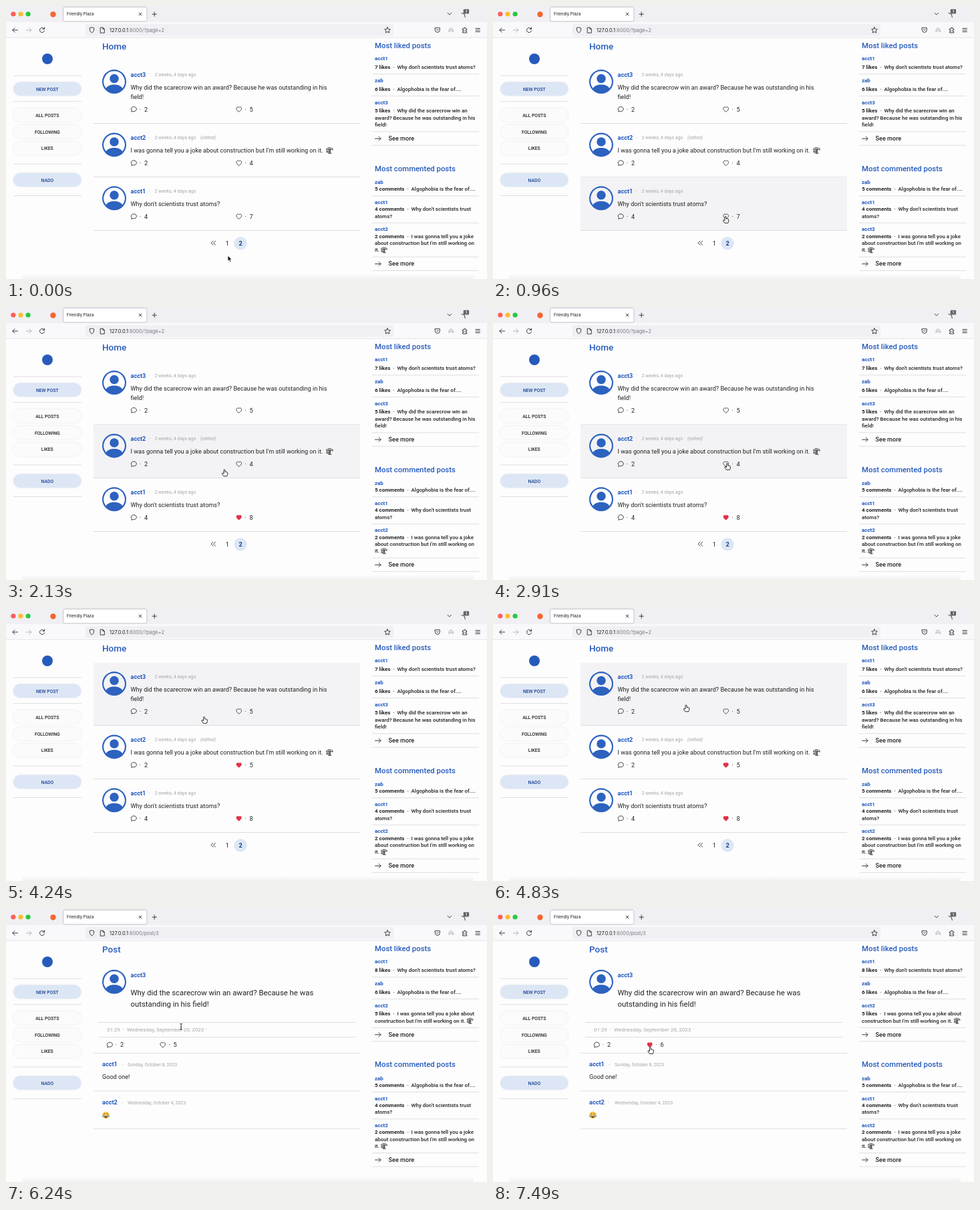
Animation of 720x408 px, one loop 7.58 s. Source, as an HTML page:

```html
<!DOCTYPE html>
<html lang="en">
<head>
<meta charset="utf-8">
<title>Friendly Plaza</title>
<style>
  html, body { margin: 0; width: 100%; height: 100%; overflow: hidden; background: #fdfdfe; }
  svg { display: block; width: 720px; height: 408px; font-family: Roboto, sans-serif; }
  .ui { font-family: Inter, sans-serif; }
  .line { fill: none; stroke: #3c3c42; stroke-width: 1; stroke-linecap: round; stroke-linejoin: round; }
  .rule { stroke: #dedee0; stroke-width: 1; }
  .hide { display: none; }
  .heart { fill: none; stroke: #222; stroke-width: 1.5; }
  .heart.on { fill: #dd3349; stroke: #dd3349; stroke-width: .6; }
  .pill { filter: drop-shadow(0 .5px .8px rgba(0, 0, 0, .11)); }
</style>
</head>
<body>
<svg id="stage" viewBox="0 0 720 408">
  <defs>
    <linearGradient id="fade" x1="0" y1="0" x2="0" y2="1">
      <stop offset="0" stop-color="#000" stop-opacity="0"/>
      <stop offset="1" stop-color="#000" stop-opacity=".05"/>
    </linearGradient>
    <g id="avatar" fill="#2d62bf">
      <circle cx="8" cy="6" r="3"/>
      <path fill-rule="evenodd" d="M0 8a8 8 0 1 1 16 0A8 8 0 0 1 0 8m8-7a7 7 0 0 0-5.47 11.37C3.24 11.23 4.8 10 8 10s4.76 1.23 5.47 2.37A7 7 0 0 0 8 1"/>
    </g>
    <path id="chat" fill="none" stroke="#222" stroke-width="1.5" stroke-linejoin="round" d="M3 12Q1 10 1 7.5C1 4 4 1.5 8 1.5s7 2.5 7 6-3 6-7 6q-1.5 0-2.7-.4Q3.6 14.5 1.5 14.6 2.8 13.4 3 12z"/>
    <path id="crane" fill="none" stroke="#333" stroke-width=".8" d="M.5 2.5 5 .8 10 2.3M.5 3.8H10M.5 2.5V3.8M10 2.3V5M4.3 1V9.5M6.5 1.4V9.5M4.3 4 6.5 6 4.3 8 6.5 9.5M6.5 4 4.3 6 6.5 8M1.8 3.8V6.2M.8 6.2H3V8H.8zM3 9.5H8.5"/>
    <g id="joy">
      <circle r="5.3" fill="#f5c648"/>
      <path d="M-3.2 .3H3.2Q2.8 3.9 0 3.9T-3.2 .3z" fill="#70421c"/>
      <path d="M-2.6 .4H2.6V1.4H-2.6z" fill="#fff"/>
      <path d="M-3.4 -1.3Q-2.2 -3 -1 -1.4M1 -1.4Q2.2 -3 3.4 -1.3" fill="none" stroke="#70421c" stroke-width=".8"/>
      <path d="M-3.3 -.2Q-6 1-5.4 3-3.3 3.3-3.3-.2zM3.3-.2Q6 1 5.4 3 3.3 3.3 3.3-.2z" fill="#4ba6e8"/>
    </g>
  </defs>
</svg>
<script>
const LOOP = 7580;
const BLUE = '#265bbb', INK = '#222', GRAY = '#a6a6aa';
const stage = document.getElementById('stage');

// Text placed by the middle of its capital letters
const text = (x, y, size, str, o = {}) =>
  `<text x="${x}" y="${(y + size * .355).toFixed(2)}" font-size="${size}" fill="${o.fill || INK}"
    font-weight="${o.bold || 400}" text-anchor="${o.anchor || 'start'}"${o.extra || ''}>${str}</text>`;
const rule = (x1, x2, y) => `<path class="rule" d="M${x1} ${y}H${x2}"/>`;
const line = (d, o = '') => `<path class="line" d="${d}" ${o}/>`;
const use = (id, x, y, s = 1) => `<use href="#${id}" transform="translate(${x} ${y}) scale(${s})"/>`;
const dot = (x, y, fill = INK) => text(x, y, 9, '·', { fill, anchor: 'middle' });
const name = (x, y, str, size = 9.12) => text(x, y, size, str, { fill: '#2058bd', bold: 700 });
const body = (x, y, str) => text(x, y, 9.12, str);
const title = (x, y, str, size) => text(x, y, size, str, { fill: BLUE, bold: 500 });

function counts(x, hx, y, comments, likes, id) {
  return use('chat', x, y - 4.6, .575) + dot(x + 14.3, y) + body(x + 20.3, y, comments) +
    `<path id="heart${id}" class="heart" transform="translate(${hx + .3} ${y - 3.8}) scale(.53)"
      d="M8.3 2C12.4-2.2 22.4 5 8.3 14.6-5.8 5 4.2-2.2 8.3 2z"/>` +
    dot(hx + 14.8, y) + `<g id="likes${id}">${body(hx + 20.4, y, likes)}</g>`;
}

function browser() {
  const lights = ['#fe5f57', '#febb2e', '#29c840'].map((c, i) =>
    `<circle cx="${10.9 + 11.1 * i}" cy="12" r="3.6" fill="${c}"/>`).join('');
  return `<path d="M0 0H720V24H0z" fill="#f0f0f4"/><path d="M0 24H720V47H0z" fill="#f9f9fb"/>
    <path d="M0 47.2H720" stroke="#dedee3" stroke-width=".8"/>${lights}
    <circle cx="70.5" cy="12.5" r="4.2" fill="#f4662f"/>
    <rect x="85.5" y="1.5" width="125.5" height="21.5" rx="2.4" fill="#fff" stroke="#bdbdc6" stroke-width=".9"/>
    <rect x="119" y="27" width="461" height="17.5" rx="2.5" fill="#f0f0f4"/>
    <g class="ui">${text(91, 12.3, 6.1, 'Friendly Plaza', { fill: '#15141a' })}
    ${['?page=2', 'post/3'].map((p, i) => `<g id="url${i}">` + text(155, 36, 7.36,
      `127.0.0.1<tspan fill="#77777f">:8000/${p}</tspan>`, { fill: '#15141a' }) + '</g>').join('')}</g>` +
    line('M199.2 10.2l3.8 3.8m0-3.8l-3.8 3.8M219 12.2h6.4M222.2 9v6.4') +
    line('M661 10.3l2.8 2.8 2.8-2.8') +
    line('M17.5 36H9.8M13 32.8L9.8 36 13 39.2') +
    line('M30.3 36H38M34.8 32.8L38 36 34.8 39.2', 'style="stroke:#b5b5ba"') +
    line('M57 33.8A3.6 3.6 0 1 0 57.6 37M57.6 32v2.5h-2.5') +
    line('M128.5 32l3.4 1.2q.2 5-3.4 7-3.6-2-3.4-7z') +
    line('M141.6 32.2h3.5l2.2 2.2v5.8h-5.7zM145 32.3v2.2h2.2') +
    line('M571 31.8l1.3 2.7 3 .4-2.2 2.1.6 3-2.7-1.5-2.7 1.5.6-3-2.2-2.1 3-.4z') +
    line('M642.3 32.7h7v3.2a3.5 3.5 0 0 1-7 0zM644.3 35l1.5 1.5 1.5-1.5') +
    line('M663 38.3q0-5.5 3.2-5.3 3.2.2 3.5 5.3M664.5 38l2-3 1.5 3', 'style="stroke:#a8a8ae"') +
    line('M683.7 34h2q-.5-2 1-2t1 2h2v2q-2-.5-2 1t2 1v2h-6v-2q1.8.3 1.8-1t-1.8-1z') +
    line('M703 33.5h6.4M703 36h6.4M703 38.5h6.4') +
    `<g id="badge0"><rect x="684.7" y="4.8" width="8.4" height="6.6" rx="1" fill="#626267"/>
      ${text(689, 8.1, 5.5, '1', { fill: '#fff', bold: 700, anchor: 'middle' })}
      ${line('M682 10.5l4.3 1.8 1 4.5')}</g>
    <g id="badge1"><rect x="682" y="5" width="11.3" height="7.2" rx="1" fill="#4a4a4f"/>
      <path d="M683.5 7H692M683.5 8.8H692M685 10.5H690.5" stroke="#aaa" stroke-width=".8" stroke-dasharray="1 .7"/>
      ${line('M687.5 12.5v4')}</g>`;
}

function menu() {
  const pill = (y, str, main) => `<rect class="pill" x="11" y="${y - 10.3}" width="101.5" height="20.4"
    rx="10.2" fill="${main ? '#dce6f5' : '#fbfbfc'}"/>` +
    text(61.8, y + .2, 6.84, str, { fill: main ? '#1d4390' : INK, bold: 500, anchor: 'middle' });
  return `<circle cx="62" cy="79" r="8" fill="${BLUE}"/>` +
    [104, 142.7, 236, 283.5].map(y => rule(11, 113, y)).join('') +
    pill(124, 'NEW POST', 1) + pill(163, 'ALL POSTS') + pill(188, 'FOLLOWING') +
    pill(212.7, 'LIKES') + pill(260, 'NADO', 1);
}

const JOKE = 'I was gonna tell you a joke about', FEAR = 'Algophobia is the fear of....';
const PITCH = 10.4;

// Each item: name, count, lines of text
function list(y, first, items) {
  let out = '';
  for (const [who, count, ...rows] of items) {
    out += name(552, y, who, 7.98);
    y += first;
    rows.forEach((row, i) => {
      const lead = i ? '' : `<tspan font-weight="700">${count}</tspan>\u00a0\u00a0·\u00a0\u00a0`;
      out += text(552, y, 7.95, lead + row, { bold: 500 });
      if (row.endsWith('it.')) out += use('crane', row === 'it.' ? 561 : 689.6, y - 4.6, .92);
      y += PITCH;
    });
    out += rule(548, 708, y);
    y += 9.4;
  }
  return out + line(`M552.5 ${y + 1}h8.6m-3-3l3 3-3 3`) +
    text(572.5, y + .6, 9.12, 'See more', { bold: 500 }) + rule(548, 708, y + 11);
}

function aside(id, top, shift) {
  const liked = [
    ['acct1', `${id ? 8 : 7} likes`, "Why don't scientists trust atoms?"],
    ['zab', '6 likes', FEAR], top];
  const talked = [
    ['zab', '5 comments', FEAR],
    ['acct1', '4 comments', "Why don't scientists trust", 'atoms?'],
    ['acct2', '2 comments', 'I was gonna tell you a joke', "about construction but I'm still working on", 'it.']];
  return title(552, 58.7, 'Most liked posts', 11.35) + list(78.6, 12.8, liked) +
    `<g transform="translate(0 ${-shift})">` + title(552, 242.5, 'Most commented posts', 11.35) +
    list(263.2, 10.2, talked) + '</g>';
}

function post(id, top, bottom, y, who, rows, comments, likes, edited) {
  const n = y + 19 + 14 * (rows.length - 1);
  return `<rect id="hover${id}" x="131" y="${top}" width="399" height="${bottom - top}" fill="#f3f3f5"/>` +
    use('avatar', 144, y - 26.2, 2.25) + name(186.5, y - 19, who) + dot(215, y - 19, GRAY) +
    text(222.5, y - 18.7, 6.95, '2 weeks, 4 days ago', { fill: GRAY }) +
    (edited ? text(291, y - 18.7, 6.95, '(edited)', { fill: GRAY, extra: ' font-style="italic"' }) : '') +
    rows.map((r, i) => body(186.5, y + 14 * i, r)).join('') +
    counts(186.7, 344, n, comments, likes, id) + rule(131, 530, bottom);
}

const home = () => `<g id="page0">` + title(144, 60.3, 'Home', 13.5) +
  post(1, 82, 175.5, 121.3, 'acct3', ['Why did the scarecrow win an award? Because he was outstanding in his', 'field!'], 2, 5) +
  post(2, 175.5, 255.5, 215.6, 'acct2', [JOKE + " construction but I'm still working on it."], 2, 4, true) +
  use('crane', 479, 210.7) +
  post(3, 255.5, 335.5, 295.5, 'acct1', ["Why don't scientists trust atoms?"], 4, 7) +
  line('M310 351.2l-3 3 3 3m3.6-6l-3 3 3 3') +
  text(331.3, 354.5, 9.12, 1, { anchor: 'middle' }) +
  `<circle cx="351" cy="354.8" r="9.7" fill="#dce6f5"/>` +
  text(351, 354.5, 9.12, 2, { bold: 700, fill: '#1c3f86', anchor: 'middle' }) +
  aside(0, ['acct3', '5 likes', 'Why did the scarecrow win an', 'award? Because he was outstanding in his', 'field!'], 0) + '</g>';

function single() {
  const reply = (y, who, date) => name(144, y, who) + dot(174, y + .7, GRAY) +
    text(182, y + 1, 6.95, date, { fill: GRAY });
  return `<g id="page1">` + title(144, 60.3, 'Post', 13.5) + use('avatar', 144, 90.8, 2.25) +
    name(186.5, 98.3, 'acct3') +
    text(186.5, 124.5, 11.36, 'Why did the scarecrow win an award? Because he was') +
    text(186.5, 142.3, 11.36, 'outstanding in his field!') + rule(138, 523, 169.5) +
    text(151, 180, 7.98, '01:29', { fill: GRAY }) + dot(175.7, 180, GRAY) +
    text(181, 180, 7.98, 'Wednesday, September 20, 2023', { fill: GRAY }) + dot(300, 180, GRAY) +
    rule(138, 523, 191.5) + counts(150.7, 230, 203, 2, 5, 4) + rule(131, 530, 215.5) +
    reply(232, 'acct1', 'Sunday, October 8, 2023') + body(144, 251, 'Good one!') + rule(131, 530, 272) +
    reply(289, 'acct2', 'Wednesday, October 4, 2023') + use('joy', 149.5, 308) + rule(131, 530, 328.7) +
    aside(1, ['acct2', '5 likes', JOKE, "construction but I'm still working on it."], PITCH) + '</g>';
}

const cursors = `<g id="cursor">
  <path id="arrow" d="M0 0V8.3L2 6.6 3.3 9.6 4.8 8.9 3.5 6H6z" fill="#111" stroke="#fff" stroke-width=".7"/>
  <path id="hand" d="M-1 1Q-1 0 0 0T1 1V3.4Q3.5 3.2 4.7 4.4V6.7Q4.7 8.2 3.8 9.8H-1.1Q-3.6 6.7-3.6 5.7-2.8 4.6-1 6z" fill="#fff" stroke="#111" stroke-width=".9"/>
  <path id="beam" d="M-1.8-4.6Q0-4.6 0-3.4 0-4.6 1.8-4.6M0-3.6V3.6M-1.8 4.6Q0 4.6 0 3.4 0 4.6 1.8 4.6M-1 .9H1" fill="none" stroke="#222" stroke-width=".9"/>
</g>`;

stage.insertAdjacentHTML('beforeend', home() + single() + menu() +
  '<rect x="24" y="400" width="676" height="8" fill="url(#fade)"/>' + browser() + cursors);

const el = {};
stage.querySelectorAll('[id]').forEach(e => el[e.id] = e);
const show = (id, on) => el[id].classList.toggle('hide', !on);

// Cursor stops: time, x, y
const path = [
  [30, 332, 373], [480, 348, 314.5], [1710, 348, 314.5], [2130, 327, 243], [2450, 350, 234],
  [2880, 350.5, 233.5], [4080, 350.5, 233.5], [4240, 296.5, 162.5], [4560, 289, 145],
  [5920, 289, 145], [6560, 235.5, 206.5]
];
const ease = u => u * u * (3 - 2 * u);

function pointAt(t) {
  const i = path.findIndex(p => p[0] > t);
  if (i === 0) return path[0].slice(1);
  if (i < 0) return path[path.length - 1].slice(1);
  const [a, b] = [path[i - 1], path[i]];
  const u = ease((t - a[0]) / (b[0] - a[0]));
  return [a[1] + (b[1] - a[1]) * u, a[2] + (b[2] - a[2]) * u];
}

function like(id, on, before) {
  el['heart' + id].classList.toggle('on', on);
  el['likes' + id].firstElementChild.textContent = before + (on ? 1 : 0);
}

function shapeAt(x, y, opened) {
  if (!opened) return y < 335.5 ? 'hand' : 'arrow';
  if (y > 198) return 'hand';
  return y < 150 || (y > 175 && y < 185) ? 'beam' : 'arrow';
}

function draw(t) {
  const opened = t >= 4930;
  const [x, y] = pointAt(t);
  const shape = shapeAt(x, y, opened);
  el.cursor.setAttribute('transform', `translate(${x.toFixed(2)} ${y.toFixed(2)})`);
  ['arrow', 'hand', 'beam'].forEach(s => show(s, s === shape));
  [0, 1].forEach(i => {
    show('page' + i, opened === !!i);
    show('url' + i, opened === !!i);
  });
  const flash = opened && t < 5360;
  show('badge0', !flash);
  show('badge1', flash);
  show('hover1', y < 175.5);
  show('hover2', y >= 175.5 && y < 255.5);
  show('hover3', y >= 255.5 && y < 335.5);
  like(1, false, 5);
  like(2, t >= 3010, 4);
  like(3, t >= 1010, 7);
  like(4, t >= 6880, 5);
}

const start = performance.now();
function frame(now) {
  draw(Math.max(0, now - start) % LOOP);
  requestAnimationFrame(frame);
}
draw(0);
requestAnimationFrame(frame);
</script>
</body>
</html>
```
